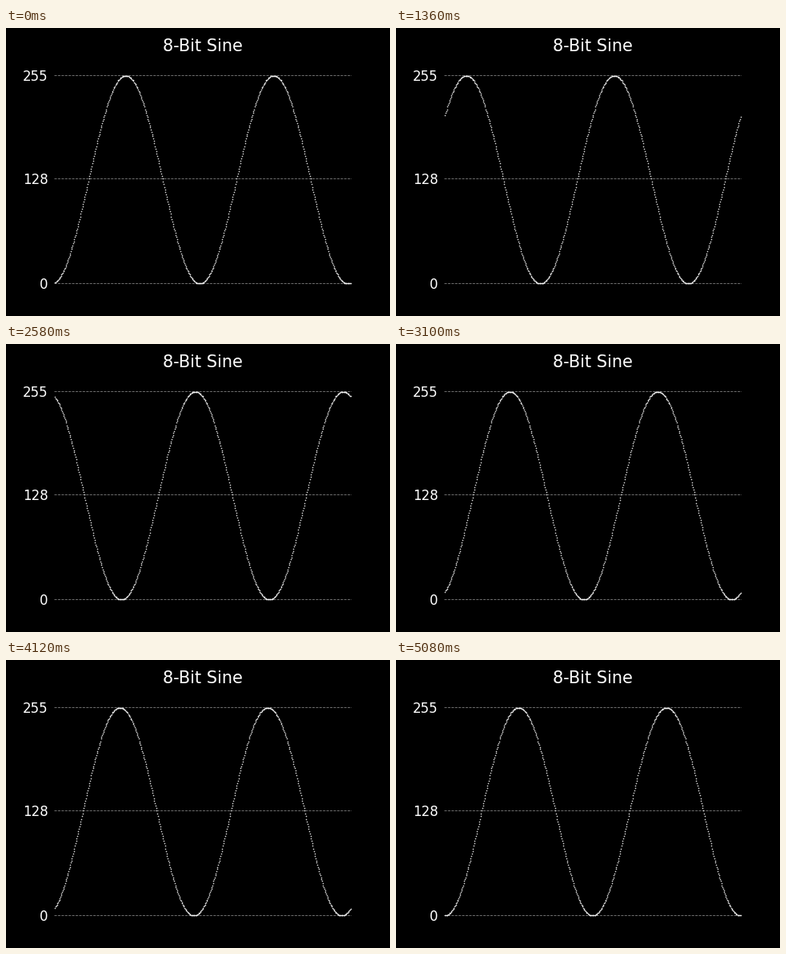
Animation of 480 by 360 pixels, one loop 5100 ms. Source, as a matplotlib script:

```python
import numpy as np
import matplotlib.pyplot as plt
from matplotlib.animation import FuncAnimation

PERIOD = 255        # samples per sine cycle
STEP = 5            # samples scrolled per frame
FRAMES = 255
INTERVAL = 20       # ms

plt.rcParams["font.family"] = "DejaVu Sans"

x = np.arange(1, 2 * PERIOD + 1)


def wave(frame):
    """Sine truncated to 8-bit integers, scrolled to the left."""
    phase = 2 * np.pi * ((x + STEP * (frame + 1)) % PERIOD) / PERIOD
    return np.floor(127.5 * (1 - np.cos(phase)))


fig, ax = plt.subplots(figsize=(6.4, 4.8), dpi=75, facecolor="black")
fig.subplots_adjust(left=0.125, right=0.9, bottom=0.11, top=0.88)
ax.set_facecolor("black")
ax.set_xlim(-1, 512)
ax.set_ylim(-1, 270)
ax.set_xticks([])
ax.set_yticks([0, 128, 255])
ax.tick_params(axis="y", length=0, pad=7, labelsize=16, labelcolor="white")
ax.grid(axis="y", color="gray", linestyle="--", linewidth=0.8)
for spine in ax.spines.values():
    spine.set_visible(False)
ax.set_title("8-Bit Sine", fontsize=20, color="white", pad=13.3)

dots, = ax.plot(x, wave(0), "w.", markersize=1)


def update(frame):
    dots.set_ydata(wave(frame))
    return dots,


anim = FuncAnimation(fig, update, frames=FRAMES, interval=INTERVAL,
                     repeat=True, repeat_delay=0, blit=False)

plt.show()
```
